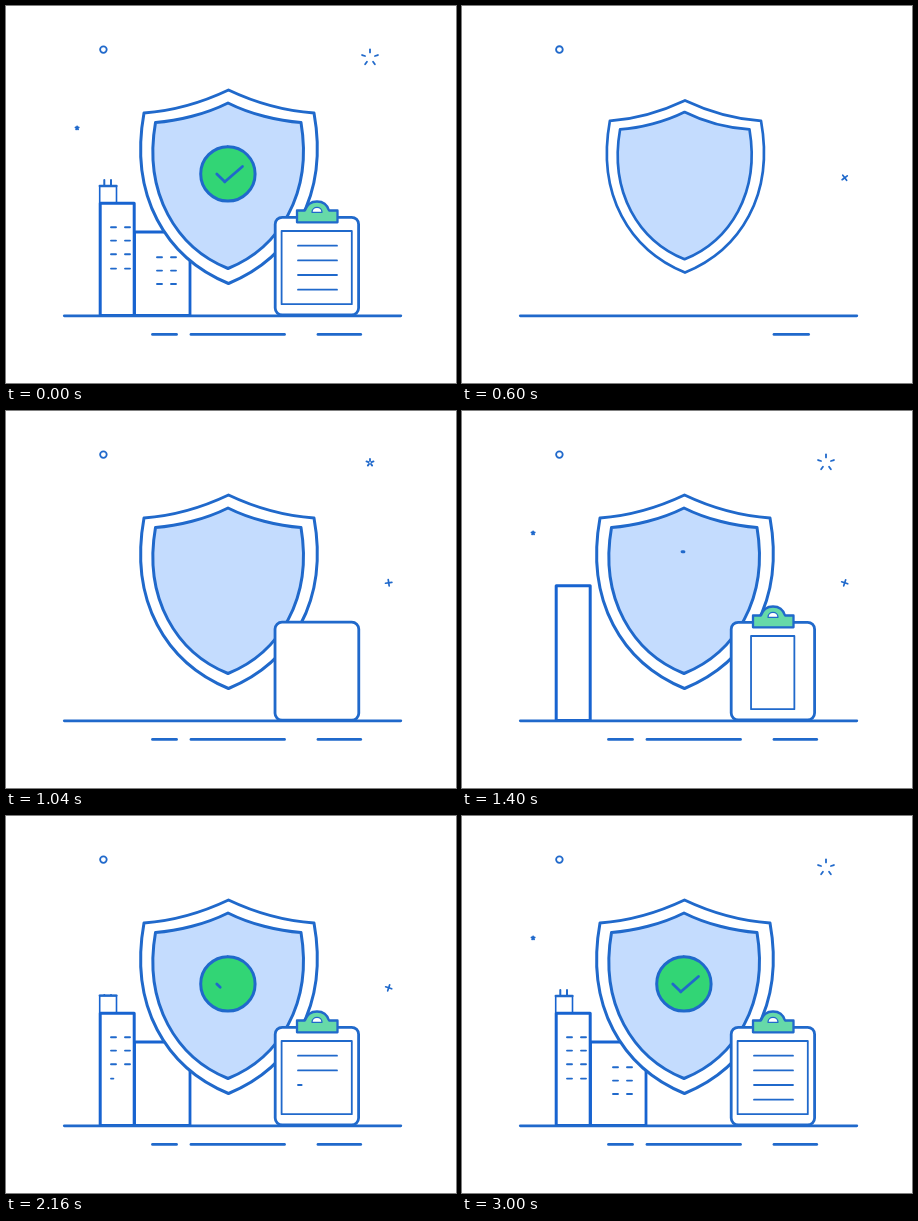
Animation, 450 px wide and 377 px high, one loop 3040 ms. Source, as an HTML page with a canvas:

```html
<!DOCTYPE html>
<html lang="en">
<head>
<meta charset="utf-8">
<title>Security shield</title>
<style>
  html, body { margin: 0; width: 100%; height: 100%; overflow: hidden; background: #fff; }
  canvas { display: block; width: 450px; height: 377px; }
</style>
</head>
<body>
<canvas id="stage" width="450" height="377"></canvas>
<script>
const ctx = document.getElementById('stage').getContext('2d');
const LOOP = 3040, HOLD = 3000;
const BLUE = '#2069cb', DEEP = '#1763d0', SKY = '#c4dcfe', GREEN = '#32d575', MINT = '#66d9a8';

const shieldOuter = new Path2D('M222.5 84C195 97 165 105 138 107C123 190 160 252 222.5 277.5C285 252 323 190 308 107C280 105 250 97 222.5 84Z');
const shieldInner = new Path2D('M222 97C200 108 172 115 149.5 116.5C137 188 171 242 222 262.5C273 242 307 188 295 116.5C272 115 244 108 222 97Z');
const clipShape = new Path2D('M291 216.3V204.5H299C301 198 305 195.5 311 195.5S321 198 323 204.5H331.5V216.3Z');
const clipHole = new Path2D('M306 206.3C306 199.8 316 199.8 316 206.3Z');

// Linear progress of t between a and b, limited to 0..1
const span = (t, a, b) => Math.min(1, Math.max(0, (t - a) / (b - a)));
const easeOut = p => 1 - (1 - p) ** 2;
const easeInOut = p => p * p * (3 - 2 * p);
const mix = (a, b, p) => a + (b - a) * p;

// Grow from zero past full size, then settle
function pop(t, start, peak, end, over) {
  return t < peak ? over * easeOut(span(t, start, peak))
                  : mix(over, 1, easeInOut(span(t, peak, end)));
}

// Linear interpolation through [time, value] pairs
function track(t, keys) {
  for (let i = 1; i < keys.length; i++) {
    const [a, va] = keys[i - 1], [b, vb] = keys[i];
    if (t <= b) return mix(va, vb, span(t, a, b));
  }
  return keys[keys.length - 1][1];
}

function paint(path, fill, width, color = BLUE) {
  ctx.lineWidth = width;
  ctx.strokeStyle = color;
  if (fill) { ctx.fillStyle = fill; ctx.fill(path); }
  ctx.stroke(path);
}

// Line of which only the first part p is drawn
function line(x1, y1, x2, y2, width, p = 1, color = BLUE) {
  if (p <= 0) return;
  ctx.lineWidth = width;
  ctx.strokeStyle = color;
  ctx.beginPath();
  ctx.moveTo(x1, y1);
  ctx.lineTo(mix(x1, x2, p), mix(y1, y2, p));
  ctx.stroke();
}

function box(x, y, w, h, width, r = 0, color = BLUE) {
  const path = new Path2D();
  path.roundRect(x, y, w, h, r);
  paint(path, '#fff', width, color);
}

function scaled(s, x, y, draw) {
  if (s <= 0) return;
  ctx.save();
  ctx.translate(x, y);
  ctx.scale(s, s);
  ctx.translate(-x, -y);
  draw();
  ctx.restore();
}

// Box that rises from its base line
function tower(x, base, w, h, s, width) {
  if (s > 0) box(x, base - h * s, w, h * s, width, 0, DEEP);
}

function windows(t, start, cols, rows) {
  rows.forEach((y, r) => cols.forEach((x, c) => {
    const a = start + (r * cols.length + c) * 62;
    line(x, y, x + 5, y, 1.9, span(t, a, a + 62));
  }));
}

function ring(t) {
  scaled(pop(t, 240, 440, 640, 1.15), 97.4, 43.6, () => {
    const path = new Path2D();
    path.arc(97.4, 43.6, 3.3, 0, 7);
    paint(path, null, 1.8);
  });
}

// Dot that bursts into five rays, every 1600 ms
function burst(t, x, y, start) {
  if (t < start) return;
  const p = (t - start) % 1600 - 180;
  if (p > 740) return;
  const inner = track(p, [[0, 0], [380, 4.9], [480, 5.2], [740, 9.6]]);
  const outer = track(p, [[-180, 0.4], [0, 1.7], [380, 8], [480, 8.3], [740, 9.7]]);
  for (let i = 0; i < 5; i++) {
    const a = i * Math.PI * 0.4, dx = Math.sin(a), dy = -Math.cos(a);
    line(x + dx * inner, y + dy * inner, x + dx * outer, y + dy * outer, 1.8);
  }
}

function cross(t) {
  const turn = track(t, [[440, 0], [760, 16], [1400, 63], [1800, 90], [2160, 153], [2900, 270]]);
  const size = span(t, 300, 420) * (1 - span(t, 2880, 2980));
  scaled(size, 382.7, 171.8, () => {
    for (const d of [45, 135]) {
      const a = (turn + d) * Math.PI / 180, dx = 3.2 * Math.cos(a), dy = 3.2 * Math.sin(a);
      line(382.7 - dx, 171.8 - dy, 382.7 + dx, 171.8 + dy, 1.7);
    }
  });
}

function buildings(t) {
  tower(128.5, 309.5, 55.5, 83.5, pop(t, 1700, 1907, 2060, 1.2), 2.8);
  windows(t, 2260, [151, 165], [251.3, 264.6, 278]);
  const mast = span(t, 2140, 2330);
  line(98.3, 179.5, 98.3, 174, 2, mast);
  line(105, 179.5, 105, 174, 2, mast);
  const roof = pop(t, 1960, 2080, 2200, 1.1);
  tower(93.7, 197, 16.8, 17, roof, 1.6);
  if (roof > 0) line(93.7, 197 - 17 * roof, 110.5, 197 - 17 * roof, 2.3);
  tower(94.2, 309.5, 34, 112.2, pop(t, 1190, 1400, 1560, 1.2), 3);
  windows(t, 1760, [105, 119], [221.2, 234.6, 248.2, 262.6]);
}

function shield(t) {
  scaled(pop(t, 400, 760, 960, 1.105), 227, 178.6, () => {
    paint(shieldOuter, '#fff', 3);
    paint(shieldInner, SKY, 3);
  });
  const sweep = span(t, 1395, 1965);
  if (!sweep) return;
  const disc = new Path2D(), arc = new Path2D(), top = -Math.PI / 2;
  disc.arc(221.9, 167.9, 27, 0, 7);
  ctx.globalAlpha = span(t, 1440, 1760);
  ctx.fillStyle = GREEN;
  ctx.fill(disc);
  ctx.globalAlpha = 1;
  arc.arc(221.9, 167.9, 27.2, top, top - Math.max(0.01, sweep * 2 * Math.PI), true);
  paint(arc, null, 3);
  line(210.8, 168, 218.8, 175.8, 2.8, span(t, 2110, 2230));
  line(218.8, 175.8, 236.5, 160.5, 2.8, span(t, 2230, 2440));
}

function clipboard(t) {
  scaled(pop(t, 900, 1100, 1220, 1.1), 311, 260, () => box(269.2, 211.3, 83.4, 97.7, 2.8, 7));
  scaled(pop(t, 1100, 1260, 1360, 1.1), 311, 206, () => {
    paint(clipShape, MINT, 2.3);
    paint(clipHole, '#fff', 1.3);
  });
  const half = 35.1 * easeOut(span(t, 1340, 1500));
  if (half > 0) box(310.7 - half, 225, half * 2, 73.2, 1.8);
  [239.7, 254.4, 269, 283.7].forEach((y, i) => {
    const a = 1780 + i * 182;
    line(292, y, 331, y, 1.8, span(t, a, a + 182));
  });
}

function draw(t) {
  ctx.fillStyle = '#fff';
  ctx.fillRect(0, 0, 450, 377);
  ctx.lineCap = 'round';
  ctx.lineJoin = 'round';
  buildings(t);
  shield(t);
  line(58.3, 309.8, 394.8, 309.8, 2.8, span(t, 120, 552));
  line(312, 328.4, 354.7, 328.4, 2.8, span(t, 520, 620));
  line(185, 328.4, 278.5, 328.4, 2.8, span(t, 640, 804));
  line(146.5, 328.4, 170.5, 328.4, 2.8, span(t, 810, 900));
  clipboard(t);
  ring(t);
  burst(t, 364, 51.6, 740);
  burst(t, 71.1, 122, 1220);
  cross(t);
}

const origin = performance.now();
function tick() {
  const t = (performance.now() - origin) % LOOP;
  // The finished picture is held across the loop point
  draw(t < 40 ? HOLD : Math.min(t, HOLD));
  requestAnimationFrame(tick);
}
tick();
</script>
</body>
</html>
```
